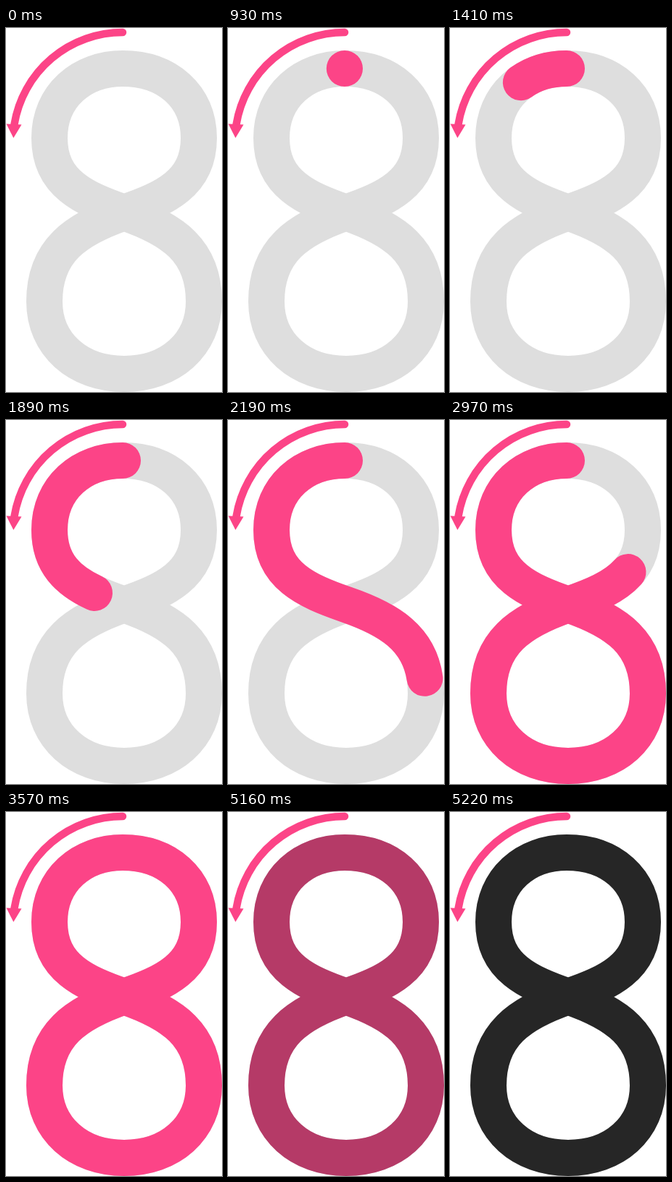
Recreate the animation shown at these times as an HTML page. Size 298 by 503 pixels, loop 6960 ms.

```html
<!DOCTYPE html>
<html lang="en">
<head>
<meta charset="utf-8">
<title>Drawing the digit eight</title>
<style>
  html, body { margin: 0; width: 100%; height: 100%; overflow: hidden; background: #fff; }
  svg { display: block; width: 100vw; height: 100vh; }
</style>
</head>
<body>
<svg viewBox="0 0 298 503" fill="none">
  <path id="track" stroke="#dedede" stroke-width="50" d="M161,56
    C104,56 60,94 60,152 C60,215 108,236 163,255
    C230,278 273,308 273,378 C273,437 227,478 163,478
    C99,478 53,437 53,378 C53,308 96,278 163,255
    C218,236 266,215 266,152 C266,94 222,56 161,56"/>
  <path id="ink" stroke-width="50" stroke-linecap="round"/>
  <path d="M161,6 A151.5,151.5 0 0 0 11.5,133" stroke="#fc4487" stroke-width="10.5" stroke-linecap="round"/>
  <path d="M0.5,132.5 L21.5,133.5 L10.3,152 Z" fill="#fc4487"/>
</svg>
<script>
const LOOP = 6960, STEP = 30;
const SHOW = 930, DONE = 3570, FADE = 5130, FADE_MS = 90;
const PINK = [252, 68, 135], DARK = [38, 38, 38];

const track = document.getElementById('track');
const ink = document.getElementById('ink');
ink.setAttribute('d', track.getAttribute('d'));
const total = track.getTotalLength();

// Path length at the spot nearest to (x, y)
function lengthAt(x, y) {
  let best = 0, min = Infinity;
  for (let s = 0; s <= total; s++) {
    const p = track.getPointAtLength(s);
    const d = Math.hypot(p.x - x, p.y - y);
    if (d < min) { min = d; best = s; }
  }
  return best;
}

// The pen passes these points at these times
const stops = [
  [1410, 98, 75], [1620, 61.5, 134], [1890, 122, 239],
  [2340, 230, 459], [2490, 110, 467], [3060, 265.5, 162]
];
const keys = [
  { t: 900, s: 0 },
  ...stops.map(([t, x, y]) => ({ t, s: lengthAt(x, y) })),
  { t: DONE, s: total }
];
const rate = (a, b) => (b.s - a.s) / (b.t - a.t);

// Speed at each key: weighted mean of its neighbours, at rest at both ends
keys.forEach((k, i) => {
  const a = keys[i - 1], b = keys[i + 1];
  k.v = a && b
    ? (rate(a, k) * (b.t - k.t) + rate(k, b) * (k.t - a.t)) / (b.t - a.t)
    : 0;
});

function drawn(t) {
  if (t < SHOW) return 0;
  if (t >= DONE) return total;
  const i = keys.findIndex(k => k.t > t);
  const a = keys[i - 1], b = keys[i];
  const h = b.t - a.t, u = (t - a.t) / h, w = 1 - u;
  return a.s * (1 + 2 * u) * w * w + a.v * h * u * w * w
       + b.s * (3 - 2 * u) * u * u - b.v * h * u * u * w;
}

function render(ms) {
  const t = Math.floor((ms % LOOP) / STEP) * STEP;
  const mix = Math.min(1, Math.max(0, (t - FADE) / FADE_MS));
  const color = PINK.map((c, i) => Math.round(c + (DARK[i] - c) * mix));
  ink.setAttribute('visibility', t < SHOW ? 'hidden' : 'visible');
  ink.setAttribute('stroke', `rgb(${color})`);
  ink.setAttribute('stroke-dasharray', t < DONE ? `${drawn(t)} ${total * 2}` : 'none');
}

let start = null;
function tick(now) {
  if (start === null) start = now;
  render(now - start);
  requestAnimationFrame(tick);
}
render(0);
requestAnimationFrame(tick);
</script>
</body>
</html>
```
